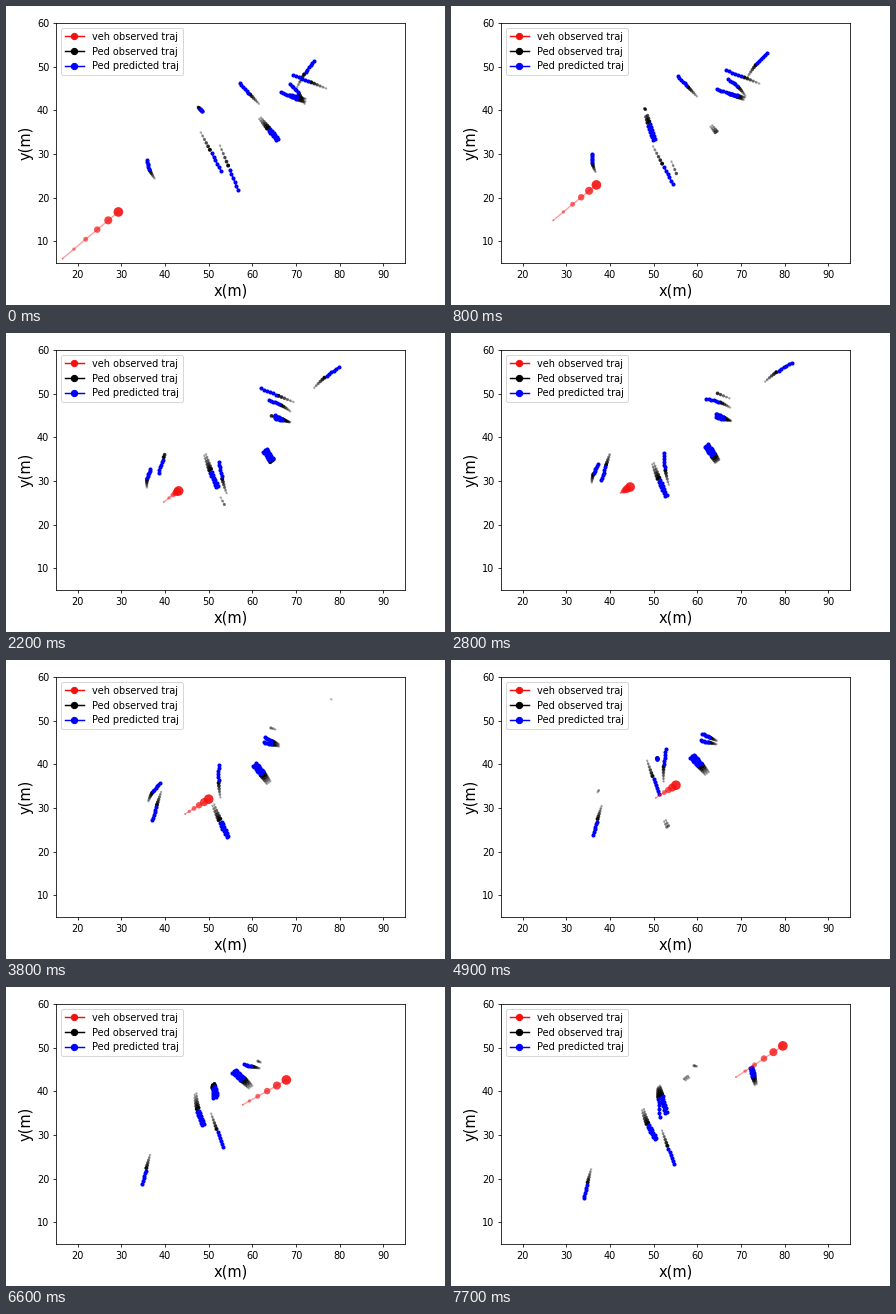
Write a matplotlib script that moves like this. It is 439 by 299 pixels and loops after 7800 ms.

```python
import numpy as np
import matplotlib.pyplot as plt
from matplotlib.animation import FuncAnimation
from matplotlib.lines import Line2D

W, H, DPI = 439, 299, 70
FRAMES, INTERVAL = 78, 100
STEP, SEEN, AHEAD = 2, 6, 6          # frames per sample, past and future samples
AGES = np.arange(SEEN - 1, -1, -1) * STEP
FIRST, LAST = -AGES[0], FRAMES - 1 + AHEAD * STEP
HELD = {7: 6, 11: 10}                # frames that repeat the previous picture
SPACING = np.array([.4, .3])         # distance between people walking together
GAP = [[np.nan, np.nan]]
RED = "#f51010"

plt.rcParams["font.family"] = "DejaVu Sans"


class Walk:
    """A person going from a to b on a gently bowed path."""

    def __init__(self, a, b, born, gone, bend, ease):
        self.a, self.b = np.array(a, float), np.array(b, float)
        self.born, self.gone, self.ease = born, gone, ease
        way = self.b - self.a
        self.bow = bend * np.array([-way[1], way[0]]) / np.hypot(*way)

    def at(self, times):
        u = ((times - self.born) / (self.gone - self.born))[:, None] ** self.ease
        return self.a + (self.b - self.a) * u + self.bow * 4 * u * (1 - u)

    def active(self, t):
        return self.born <= t <= self.gone

    def predicted(self, t):
        return self.at(t + STEP * np.arange(1, AHEAD + 1))


peds = []


def walk(a, b, born=FIRST, gone=LAST, bend=0, ease=1, group=1):
    for k in range(group):
        shift = k * SPACING
        peds.append(Walk(a + shift, b + shift, born, gone, bend, ease))


# left side
walk((37.6, 24.4), (37.4, 34), gone=41, bend=1.7)
walk((40, 36.3), (34, 15.5), born=19, bend=-.3)

# centre, heading down
walk((47.5, 40.8), (48.1, 40.2), gone=4)
walk((48.2, 34.9), (53.8, 24.2), gone=17)
walk((52.6, 31.9), (55.2, 25.5), gone=4)
walk((48.2, 38.5), (53, 25.6), born=4, gone=43, bend=-.3, group=2)
walk((48.5, 40.8), (54.6, 23.3), born=39)
walk((46.8, 39.2), (50.2, 29), born=56, bend=-.7, group=2)
walk((50.8, 41.4), (51.4, 34), born=47, ease=3)
walk((50.9, 41.5), (52.6, 35), born=58, ease=2, group=2)

# centre, heading up
walk((54.1, 27.2), (52.4, 40.8), born=12, gone=53, bend=.8)

# right side
walk((61.5, 41.5), (57.9, 45.3), gone=8)
walk((61.6, 38), (64.1, 34.9), gone=4, group=2)
walk((64.1, 34.3), (56.8, 43), born=22, gone=70, bend=-.4, group=3)

# upper right
walk((70.3, 45.3), (78.1, 54.9), gone=28, bend=.8)
walk((76.9, 45), (64.3, 50.2), gone=27)
walk((72, 41.5), (64, 48.4), gone=33, bend=-1.2)
walk((72.2, 42), (64.4, 44.9), gone=20)
walk((71.8, 41.8), (61.3, 46.9), gone=60)
walk((72.2, 42.6), (59.1, 45.9), gone=72)
walk((73.2, 41.4), (72.1, 45.3), born=67, group=2)

# the vehicle brakes for the crowd, then speeds up again
KEYS = np.array([
    (-10, 16.5, 6), (0, 29.3, 16.7), (14, 40.9, 26.1), (28, 44.6, 28.6),
    (38, 50, 32), (49, 55.1, 35.2), (56, 57.8, 36.9), (66, 67.8, 42.6),
    (77, 79.6, 50.4)])
KEY_T, KEY_P = KEYS[:, 0], KEYS[:, 1:]
KEY_V = np.gradient(KEY_P, KEY_T, axis=0)


def vehicle(t):
    """Cubic Hermite curve through the key points."""
    i = np.clip(np.searchsorted(KEY_T, t) - 1, 0, len(KEY_T) - 2)
    h = (KEY_T[i + 1] - KEY_T[i])[:, None]
    u = (t - KEY_T[i])[:, None] / h
    smooth = u * u * (3 - 2 * u)
    return (KEY_P[i] + (KEY_P[i + 1] - KEY_P[i]) * smooth
            + h * u * (1 - u) * ((1 - u) * KEY_V[i] - u * KEY_V[i + 1]))


fig = plt.figure(figsize=((W + .01) / DPI, (H + .01) / DPI), dpi=DPI, facecolor="white")
ax = fig.add_axes([50 / W, 42 / H, 349 / W, 240 / H])
ax.set(xlim=(15, 95), ylim=(5, 60), xticks=range(20, 100, 10), yticks=range(10, 70, 10))
ax.set_xlabel("x(m)", fontsize=15)
ax.set_ylabel("y(m)", fontsize=15, labelpad=3)

entries = [(RED, "veh observed traj"), ("black", "Ped observed traj"),
           ("blue", "Ped predicted traj")]
ax.legend(handles=[Line2D([], [], color=c, marker="o", ms=6.5, label=s)
                   for c, s in entries], loc="upper left")

seen_line, = ax.plot([], [], color="black", lw=.8, alpha=.25, zorder=2)
seen_dots = ax.scatter([], [], linewidths=0, zorder=3)
next_line, = ax.plot([], [], color="blue", lw=1.4, marker="o", ms=4.2, mew=0, zorder=4)
veh_line, = ax.plot([], [], color=RED, lw=1.4, alpha=.4, zorder=5)
veh_dots = ax.scatter([], [], linewidths=0, zorder=6)

rank = np.arange(SEEN)
ped_size = (2.6 + .3 * rank) ** 2
veh_size = (1.9 + 1.6 * rank) ** 2


def shades(color, low, high):
    return np.array([plt.matplotlib.colors.to_rgba(color, a)
                     for a in np.linspace(low, high, SEEN)])


ped_shade = shades("black", .28, .95)
veh_shade = shades(RED, .4, .9)


def set_dots(dots, points, sizes, colors):
    dots.set_offsets(points)
    dots.set_sizes(sizes)
    dots.set_facecolors(colors)


def join(parts):
    return np.vstack([row for part in parts for row in (part, GAP)]).T


def draw(frame):
    t = HELD.get(frame, frame)
    times = t - AGES
    past, sizes, colors = [], [], []
    for ped in peds:
        keep = (times >= ped.born) & (times <= ped.gone)
        past.append(ped.at(times[keep]))
        sizes.append(ped_size[keep])
        colors.append(ped_shade[keep])
    set_dots(seen_dots, np.vstack(past), np.concatenate(sizes), np.vstack(colors))
    seen_line.set_data(*join(past))
    next_line.set_data(*join([p.predicted(t) for p in peds if p.active(t)]))

    trail = vehicle(times)
    veh_line.set_data(*trail.T)
    set_dots(veh_dots, trail, veh_size, veh_shade)
    return seen_line, seen_dots, next_line, veh_line, veh_dots


anim = FuncAnimation(fig, draw, frames=FRAMES, interval=INTERVAL,
                     init_func=lambda: draw(0), repeat=True, repeat_delay=0)
plt.show()
```
